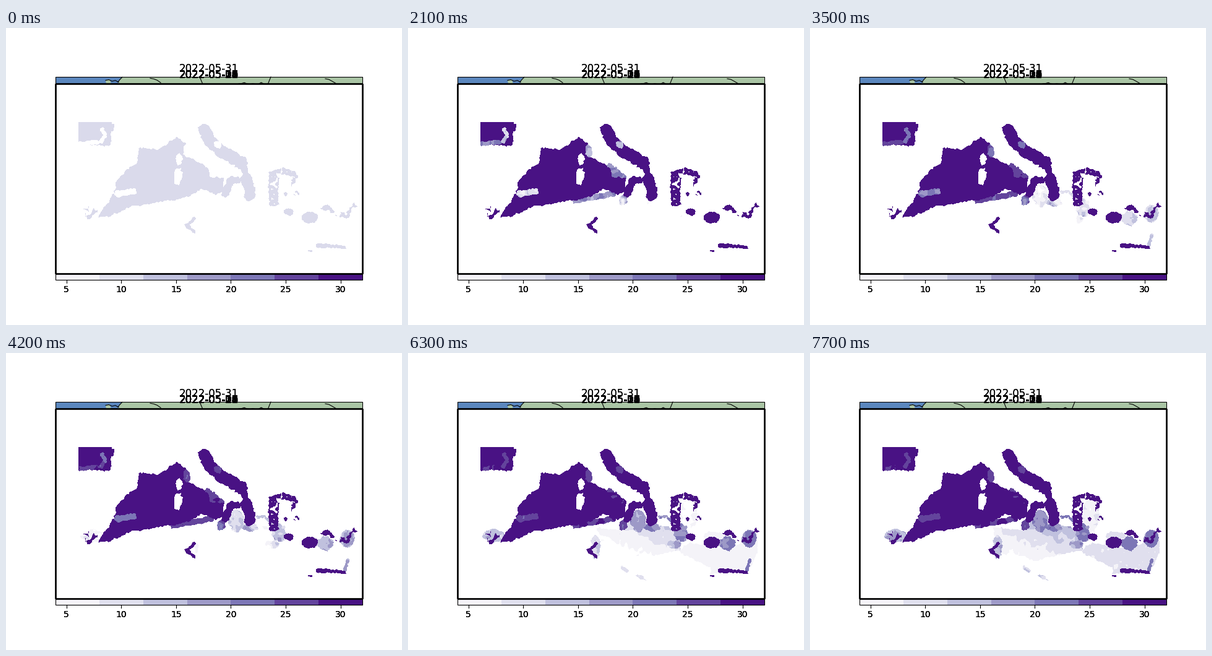
These frames come from a looping animation (640x480 px, 8 s). A matplotlib script:

```python
import numpy as np
import matplotlib.pyplot as plt
from matplotlib.animation import FuncAnimation
from matplotlib.colors import ListedColormap
from matplotlib.patches import Polygon, Rectangle
from matplotlib.path import Path

plt.rcParams["font.family"] = "DejaVu Sans"
W, H = 640, 480
STEP, HOLD, FRAMES, STATES = 100, 700, 80, 12
X0, Y0, X1, Y1 = 117, 152, 570, 370
DAYS = 31
WARM = 9
rng = np.random.default_rng(5)

nx, ny = X1 - X0, Y1 - Y0
gx, gy = np.meshgrid(np.arange(X0, X1) + 0.5, np.arange(Y0, Y1) + 0.5)


def noise(cell):
    """Smooth random field in -1..1."""
    rows, cols = ny // cell + 2, nx // cell + 2
    a = rng.uniform(-1, 1, (rows, cols))
    xs, ys = np.arange(nx) / cell, np.arange(ny) / cell
    a = np.array([np.interp(xs, np.arange(cols), r) for r in a])
    return np.array([np.interp(ys, np.arange(rows), c) for c in a.T]).T


# ragged coasts come from a shifted grid, patches from grain
wx = gx + 1.4 * noise(3) + 1.2 * noise(8)
wy = gy + 1.4 * noise(3) + 1.2 * noise(8)
grain = 0.7 * noise(14) + 0.6 * noise(5)
speckle = noise(4)
heat = np.zeros((ny, nx))


def paint(mask, value, rough=0.4, holes=None):
    if holes is not None:
        mask = mask & (speckle > holes)
    rough = 0 if np.isscalar(value) and value in (0, WARM) else rough
    heat[mask] = (value + rough * grain)[mask]


def blob(pts, value, **kw):
    inside = Path(pts).contains_points(np.column_stack([wx.ravel(), wy.ravel()]))
    paint(inside.reshape(ny, nx), value, **kw)


def band(pts, r, value, **kw):
    """Thick line through a few points."""
    mask = np.zeros((ny, nx), bool)
    for (ax_, ay), (bx, by) in zip(pts, pts[1:]):
        dx, dy = bx - ax_, by - ay
        t = np.clip(((wx - ax_) * dx + (wy - ay) * dy) / (dx**2 + dy**2), 0, 1)
        mask |= np.hypot(wx - ax_ - t * dx, wy - ay - t * dy) < r
    paint(mask, value, **kw)


def spot(x, y, rx, ry, value, **kw):
    paint(((wx - x) / rx) ** 2 + ((wy - y) / ry) ** 2 < 1, value, **kw)


# open southern and eastern water: warmer to the north and east
south = 3.6 + 0.03 * (295 - gy) + 0.012 * (gx - 375)
blob([(298, 282), (345, 287), (366, 262), (385, 276), (422, 281), (441, 302),
      (440, 320), (402, 326), (366, 335), (330, 333), (301, 334)], south)
blob([(440, 319), (455, 306), (505, 316), (566, 300), (565, 320), (553, 348),
      (546, 355), (488, 357), (490, 347), (445, 326)], 3.2, rough=0.25)

# waters that warm at their own pace
spot(303, 314, 8, 20, 4, rough=0.8)
spot(372, 272, 12, 17, 5.2, rough=0.8)
spot(395, 282, 13, 6, 5.5, rough=0.8)
spot(348, 278, 7, 9, 6.4, rough=0.8)
spot(454, 262, 14, 26, 2.9, rough=0.8)
spot(441, 290, 11, 15, 5.5, rough=0.8)
spot(495, 295, 16, 7, 3.5)
spot(516, 308, 13, 11, 5.6)
spot(552, 300, 12, 14, 5.5, rough=0.8)
spot(430, 310, 11, 7, 4.8, rough=0.8)
spot(138, 295, 18, 10, 4.9, rough=0.8)
band([(408, 265), (418, 265), (428, 274)], 3, 5.6, holes=-0.3)
band([(346, 346), (353, 353)], 3, 3.8)
band([(368, 359), (385, 366)], 2, 3.8, holes=-0.3)
band([(547, 353), (553, 335)], 2.5, 5.8)
band([(270, 279), (297, 274), (331, 268)], 5, 7)
band([(326, 226), (346, 242)], 7, 7.1)

# water that is warm throughout
blob([(110, 146), (171, 146), (169, 190), (150, 190), (117, 189)], WARM)
spot(172, 162, 3, 6, WARM)
blob([(148, 305), (161, 288), (174, 268), (179, 248), (195, 231), (212, 219),
      (214, 194), (245, 196), (276, 176), (292, 186), (288, 204), (322, 223),
      (332, 240), (352, 243), (352, 264), (338, 270), (316, 259), (296, 272),
      (268, 279), (236, 284), (200, 289), (168, 305)], WARM)
band([(321, 165), (330, 183), (350, 201), (380, 217)], 10, WARM)
band([(383, 216), (386, 234)], 5, WARM)
band([(355, 268), (363, 246), (374, 246)], 6, WARM)
band([(388, 242), (394, 262), (394, 271)], 9, WARM)
band([(432, 240), (433, 281)], 8, WARM, holes=-0.2)
band([(430, 237), (448, 231), (464, 236)], 5, WARM, holes=-0.4)
band([(468, 240), (464, 256), (470, 268)], 4, WARM, holes=0.1)
band([(512, 289), (536, 300), (552, 303), (567, 285)], 4, WARM, holes=0.1)
band([(130, 290), (144, 296), (133, 303)], 5, WARM, holes=0.2)
band([(304, 307), (292, 319), (304, 330)], 3, WARM)
band([(504, 352), (520, 352), (546, 355)], 3, WARM)
spot(456, 297, 7.5, 6, WARM)
spot(452, 268, 3, 3, WARM)
spot(491, 306, 13, 9.5, WARM)
spot(518, 291, 6, 5, WARM)
spot(492, 360, 4, 1.5, WARM)

# late corners inside the warm water, and two islands
band([(155, 165), (161, 172), (154, 184)], 3.5, 6.7)
band([(119, 187), (148, 185)], 3.5, 7.1)
band([(180, 268), (206, 264)], 5, 6.5)
spot(292, 199, 6, 10, 6.9)
spot(342, 188, 6, 6, 6.8)
spot(278, 240, 6.5, 14, 0)
spot(279.5, 212, 5, 10, 0)


def levels(k):
    """Cooler water starts later, rises slower and stops lower."""
    if k == 0:
        return np.where(heat == WARM, 8, 0)
    lag = 7.2 - np.minimum(heat, 7.2)
    age = np.maximum(k - 0.9 - 1.55 * lag, 0)
    rise = heat * (1 - np.exp(-age / (1.5 + 0.5 * lag)))
    return np.where(heat == WARM, 7, np.clip(np.floor(rise), 0, 7)).astype(int)


states = [levels(k) for k in range(STATES)]
purples = [plt.cm.Purples((i + 0.5) / 7) for i in range(6)] + ["#491284"]
cmap = ListedColormap(["white"] + purples + ["#dadaeb"])

fig = plt.figure(figsize=(W / 100, H / 100), dpi=100, facecolor="white")
ax = fig.add_axes([0, 0, 1, 1])
ax.set_axis_off()
L, R, TOP, MAP_TOP, BAR, BOTTOM = 80, 576, 79, 89.6, 396.9, 406.6
LAND, OCEAN = "#aac5a5", "#5b87be"


def box(x0, y0, x1, y1, face="none", edge="none", z=1, times=1):
    for _ in range(times):
        ax.add_patch(Rectangle((x0, y0), x1 - x0, y1 - y0, fc=face, ec=edge,
                               lw=0.8, zorder=z))


def label(x, y, s, size, va, times=1):
    for _ in range(times):
        ax.text(x, y, s, size=size, ha="center", va=va, zorder=9)


def coast(x0, y0, x1, y1, wobble=1.5):
    n = max(abs(x1 - x0) // 4, 3)
    x, y = np.linspace(x0, x1, n), np.linspace(y0, y1, n)
    ax.plot(x, y + rng.uniform(-wobble, wobble, n), "k", lw=0.8, zorder=2)


# visible strip of the map underneath
box(L, TOP, R, MAP_TOP, OCEAN)
for shore in ([(188, TOP), (R, TOP), (R, 91), (181, 91), (183, 84)],
              [(161, 84), (168, 83), (170, 91), (162, 91)]):
    ax.add_patch(Polygon(shore, fc=LAND, zorder=1))
coast(161, 84, 182, 87)
coast(181, 87, 188, 79, 0.5)
coast(233, 80, 250, 87)
coast(313, 79, 318, 91, 0.3)
coast(376, 90, 417, 89)
coast(428, 79, 423, 91, 0.3)
coast(516, 81, 533, 89, 1)
box(L, TOP, R, MAP_TOP, edge="k", z=3)

# map panel and colour bar; the panel frame is stacked once per day
box(L, MAP_TOP, R, BAR, "white", z=4)
img = ax.imshow(states[0], cmap=cmap, vmin=-0.5, vmax=8.5, zorder=5,
                extent=(X0, X1, Y1, Y0), interpolation="nearest", aspect="auto")
cell = (R - L) / 7
for i, color in enumerate(purples):
    box(L + i * cell, BAR, L + (i + 1) * cell, BOTTOM, color, z=6)
box(L, BAR, R, BOTTOM, edge="k", z=7)
box(L, MAP_TOP, R, BAR, edge="k", z=8, times=DAYS)

for v in range(5, 31, 5):
    x = L + (v - 4) * (R - L) / 28
    ax.plot([x, x], [BOTTOM, BOTTOM + 4.9], "k", lw=0.8, zorder=7)
    label(x, 416.2, str(v), 10, "top", times=3)

# earlier dates pile up on one title line
for day in range(1, DAYS):
    label(328, 81.2, f"2022-05-{day:02d}", 12, "baseline")
label(328, 70.9, f"2022-05-{DAYS}", 12, "baseline", times=2)

ax.set_xlim(0, W)
ax.set_ylim(H, 0)


def update(i):
    img.set_data(states[i * STEP // HOLD])
    return [img]


anim = FuncAnimation(fig, update, frames=FRAMES, interval=STEP, repeat=True,
                     repeat_delay=0, blit=False)
plt.show()
```
